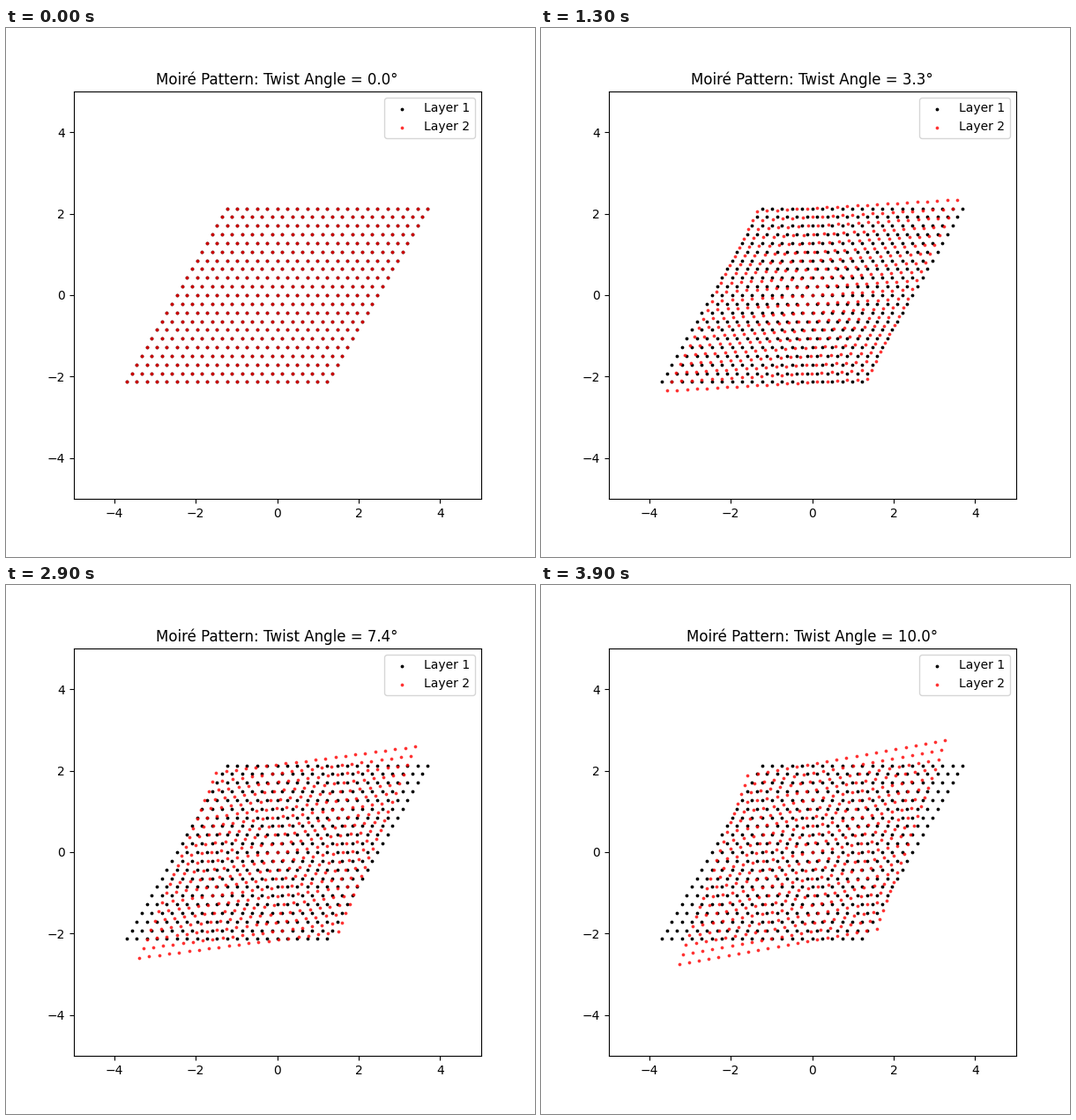
Recreate the animation shown at these times as a matplotlib script. Size 600 by 600 pixels, loop 4 s.

```python
import numpy as np
import matplotlib.pyplot as plt
from matplotlib.animation import FuncAnimation

FRAMES = 40
INTERVAL = 100
SPACING = 0.246  # lattice constant
REACH = 10       # cells on each side of the centre

angles = np.linspace(0, 10, FRAMES)


def make_lattice():
    i, j = np.meshgrid(np.arange(-REACH, REACH + 1),
                       np.arange(-REACH, REACH + 1))
    x = SPACING * (i + j / 2)
    y = SPACING * j * np.sqrt(3) / 2
    return np.column_stack([x.ravel(), y.ravel()])


def rotate(points, degrees):
    t = np.radians(degrees)
    c, s = np.cos(t), np.sin(t)
    return points @ np.array([[c, s], [-s, c]])


lattice = make_lattice()

fig, ax = plt.subplots(figsize=(6, 6), dpi=100)
ax.set_aspect("equal")
ax.set_xlim(-5, 5)
ax.set_ylim(-5, 5)

ax.scatter(*lattice.T, s=3, color="black", label="Layer 1")
twisted = ax.scatter(*lattice.T, s=3, color="red", alpha=0.7, label="Layer 2")
ax.legend(loc="upper right")
title = ax.set_title("")


def update(frame):
    angle = angles[frame]
    twisted.set_offsets(rotate(lattice, angle))
    title.set_text(f"Moiré Pattern: Twist Angle = {angle:.1f}°")
    return twisted, title


anim = FuncAnimation(fig, update, frames=FRAMES, interval=INTERVAL,
                     repeat=True, repeat_delay=0, blit=False)
plt.show()
```
